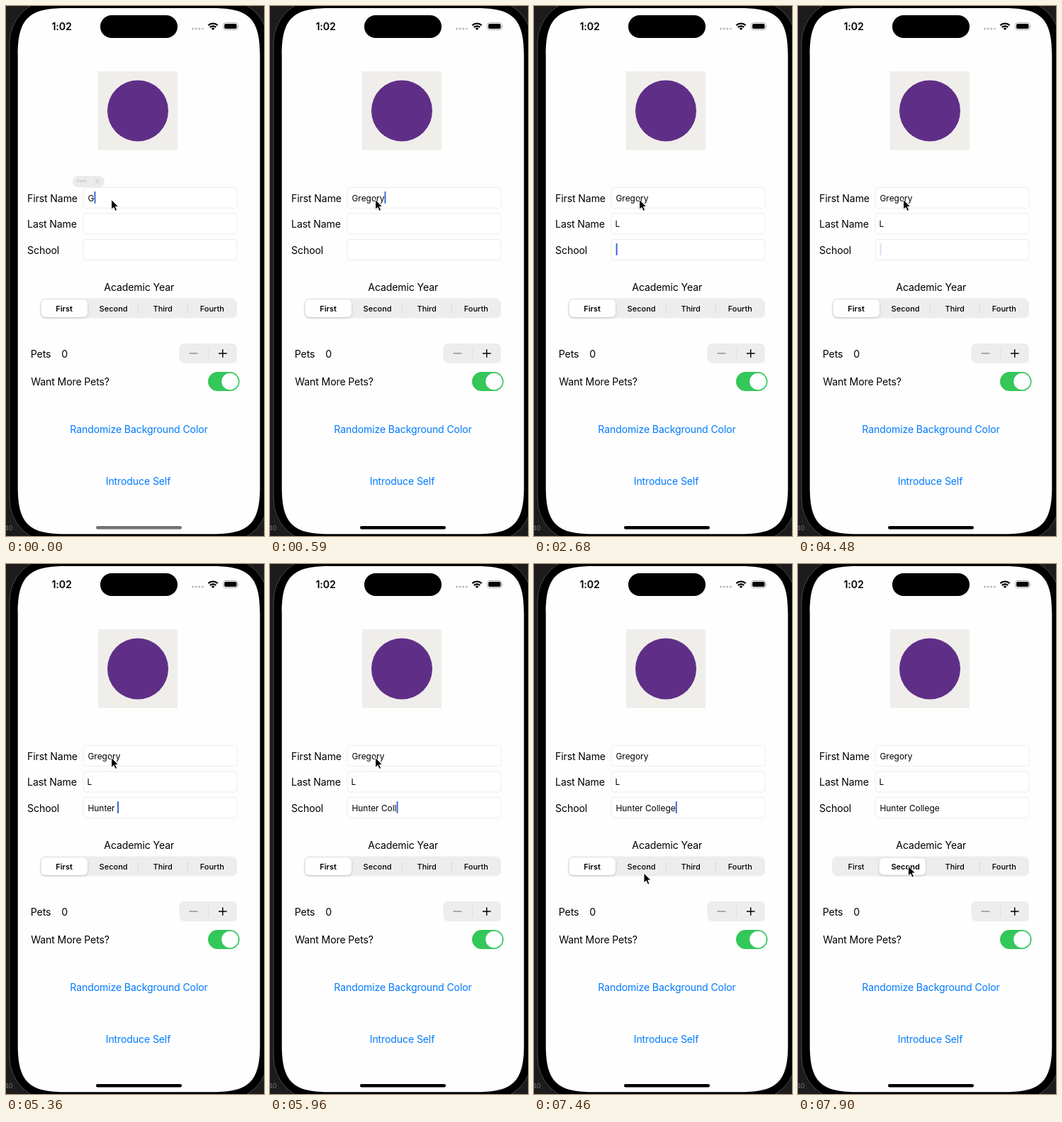
An HTML page that plays this animation: 364 by 746 pixels, repeating every 8 s.

```html
<!DOCTYPE html>
<html lang="en">
<head>
<meta charset="utf-8">
<title>Introduction form</title>
<style>
  html, body { margin: 0; height: 100%; overflow: hidden; background: #000; }
  svg { display: block; width: 364px; height: 746px; }
  text { font: 14.1px Inter, sans-serif; letter-spacing: -.13px; white-space: pre; }
  .middle { text-anchor: middle; }
  .link { fill: #007aff; }
  .time { font-size: 14.2px; font-weight: 600; }
  .small { font-size: 11.9px; letter-spacing: 0; }
  .segment { font-size: 11px; font-weight: 500; letter-spacing: 0; }
  .segment.on { font-weight: 600; }
  .box { fill: #fff; stroke: #ececec; }
  .grey { fill: #ededee; }
  .rule { stroke: #d9d9db; }
</style>
</head>
<body>
<svg viewBox="0 0 364 746">
  <rect width="364" height="746" fill="#1d1b1b"/>
  <text x="-2" y="738" style="font-size:9px" fill="#777">40</text>
  <rect x="5" y="-9" width="365" height="764" rx="61" stroke="#4a4a4a"/>
  <path fill="#fefefe" d="M16.7 69c0-50.7 15.3-66 66-66h209.6c50.7 0 66 15.3 66 66
    v608.3c0 50.700-15.300 66-66 66h-209.600c-50.700 0-66-15.300-66-66z"/>

  <!-- status bar -->
  <text class="time middle" x="78.5" y="33.5">1:02</text>
  <rect x="133" y="13" width="109" height="32" rx="16"/>
  <path d="M263.5 32h15" stroke="#bbb" stroke-width="3" stroke-linecap="round" stroke-dasharray="0 4.6"/>
  <g fill="none" stroke="#000" stroke-width="2.3">
    <path d="M285.4 27.3a9.4 9.4 0 0 1 13.2 0M287.8 30a6 6 0 0 1 8.4 0"/>
    <path d="M292 33.9l-2.2-2.2a3.1 3.1 0 0 1 4.4 0z" fill="#000" stroke="none"/>
  </g>
  <rect x="306.5" y="23.5" width="20.5" height="10" rx="3.2" fill="none" stroke="#aaa"/>
  <rect x="308" y="25" width="17.5" height="7" rx="2"/>
  <path d="M328.3 27v3.4q1.4-1.7 0-3.4" fill="#aaa"/>

  <!-- badge -->
  <rect x="130" y="92" width="112" height="111" fill="#f0eeeb"/>
  <circle cx="186" cy="147.5" r="43" fill="#5f2f87"/>

  <!-- form -->
  <g id="form"></g>
  <rect id="caret" width="2" height="17" rx=".8" fill="#3f66dc"/>
  <g id="bubble">
    <rect x="94" y="239" width="45" height="16" rx="8" fill="#ebebeb"/>
    <text x="100" y="248.3" style="font-size:5.4px" fill="#b4b4b4">Paste</text>
    <path d="M126 244h1.5l3 5h1.5M126 249h1.5l3-5h1.5" fill="none" stroke="#bdbdbd" stroke-width=".8"/>
  </g>

  <text class="middle" x="187.7" y="401">Academic Year</text>
  <rect class="grey" x="48" y="411.5" width="278" height="28" rx="7.5"/>
  <path class="rule" d="M256.3 419v13.5"/>
  <path class="rule" id="divider" d="M186.5 419v13.5"/>
  <rect id="pill" rx="6" fill="#fff" style="filter:drop-shadow(0 1px 1.5px #0003)"/>
  <g id="segments"></g>

  <text x="34.8" y="494.6">Pets</text>
  <text x="78.3" y="494.6">0</text>
  <rect class="grey" x="244.5" y="475" width="81.5" height="28" rx="7"/>
  <path class="rule" d="M285.3 481.5v15"/>
  <path d="M258.5 489h12" stroke="#8a8a8c" stroke-width="1.4"/>
  <path d="M300 489h11.5M305.75 483.25v11.5" stroke="#000" stroke-width="1.4"/>
  <text x="35.2" y="534">Want More Pets?</text>
  <rect x="285" y="515" width="44.5" height="27" rx="13.5" fill="#34c759"/>
  <circle cx="316" cy="528.5" r="11.8" fill="#fff"/>

  <text class="link middle" x="187.5" y="600.6">Randomize Background Color</text>
  <text class="link middle" x="186.5" y="673.6">Introduce Self</text>
  <rect id="home" x="127" y="732" width="121" height="4.5" rx="2.25"/>

  <path id="pointer" d="M0 0v14l3.3-3 2.2 5 2.5-1.1-2.2-4.9h4.3z" stroke="#fff" stroke-linejoin="round"/>
</svg>
<script>
const LOOP = 8000;
const $ = id => document.getElementById(id);
const set = (el, attrs) => Object.entries(attrs).forEach(([k, v]) => el.setAttribute(k, v));

function add(parent, tag, attrs, text = '') {
  const el = document.createElementNS('http://www.w3.org/2000/svg', tag);
  set(el, attrs);
  el.textContent = text;
  return parent.appendChild(el);
}

const inputs = ['First Name', 'Last Name', 'School'].map((label, i) => {
  const y = 255.5 + i * 36.5;
  add($('form'), 'text', { x: 30.1, y: y + 20.4 }, label);
  add($('form'), 'rect', { class: 'box', x: 109, y, width: 217, height: 29, rx: 4 });
  return add($('form'), 'text', { class: 'small', x: i === 1 ? 114.5 : 115.5, y: y + 19 });
});
const segments = ['First', 'Second', 'Third', 'Fourth'].map((label, i) =>
  add($('segments'), 'text', { class: 'segment middle', x: 82 + i * 69.6, y: 429.8 }, label));

// Each entry changes part of the state from its time on.
const timeline = [
  [0, { values: ['G', '', ''], focus: 0, caret: 1, bubble: 1, home: .55,
        pointer: [148.7, 272.5], pill: [49.5, 413.3, 65.5, 24.7], selected: 0 }],
  [140, { values: ['Gre', '', ''], bubble: .45, home: .68 }],
  [290, { values: ['Greg', '', ''], bubble: 0, home: .8 }],
  [440, { values: ['Grego', '', ''], home: .92 }],
  [590, { values: ['Gregory', '', ''], home: 1 }],
  [890, { focus: 1 }],
  [1340, { values: ['Gregory', 'L', ''] }],
  [1640, { focus: 2 }],
  ...fades([2240, .4], [2390, 0], [2540, .4], [2680, 1]),
  ...fades([3130, .5], [3280, 0], [3580, .5], [3730, 1]),
  ...fades([4180, .4], [4330, 0], [4480, .22], [4620, 1]),
  ...typeSchool([4620, 1], [4920, 2], [5070, 3], [5220, 5], [5360, 7], [5510, 8],
                [5660, 9], [5810, 10], [5960, 11], [6110, 12], [6260, 14]),
  ...fades([6860, .3], [7010, 0], [7160, .4], [7300, 1], [7750, .4], [7900, 0]),
  [7010, { pointer: [149, 295] }],
  [7160, { pointer: [150, 360] }],
  [7300, { pointer: [152, 415] }],
  [7450, { pointer: [155, 435] }],
  [7600, { pointer: [155.5, 428] }],
  [7750, { pointer: [155.5, 425], pill: [74, 414, 65, 23.5], selected: 1 }],
  [7900, { pill: [114.7, 414, 65.3, 23.7] }],
];

function fades(...steps) {
  return steps.map(([time, caret]) => [time, { caret }]);
}

function typeSchool(...steps) {
  return steps.map(([time, n]) =>
    [time, { values: ['Gregory', 'L', 'Hunter College'.slice(0, n)] }]);
}

function render(now) {
  const t = now % LOOP;
  const state = Object.assign({}, ...timeline.filter(([time]) => time <= t).map(step => step[1]));
  inputs.forEach((input, i) => input.textContent = state.values[i]);

  const active = inputs[state.focus];
  const width = active.textContent ? active.getComputedTextLength() : 0;
  set($('caret'), { x: 115.6 + width, y: 261 + state.focus * 36.5, opacity: state.caret });
  set($('bubble'), { opacity: state.bubble });
  set($('home'), { opacity: state.home });
  set($('pointer'), { transform: `translate(${state.pointer})` });

  const [x, y, w, h] = state.pill;
  set($('pill'), { x, y, width: w, height: h });
  set($('divider'), { opacity: state.selected ? 0 : 1 });
  segments.forEach((segment, i) => segment.classList.toggle('on', i === state.selected));
}

const start = performance.now();
(function tick() {
  render(performance.now() - start);
  requestAnimationFrame(tick);
})();
</script>
</body>
</html>
```
